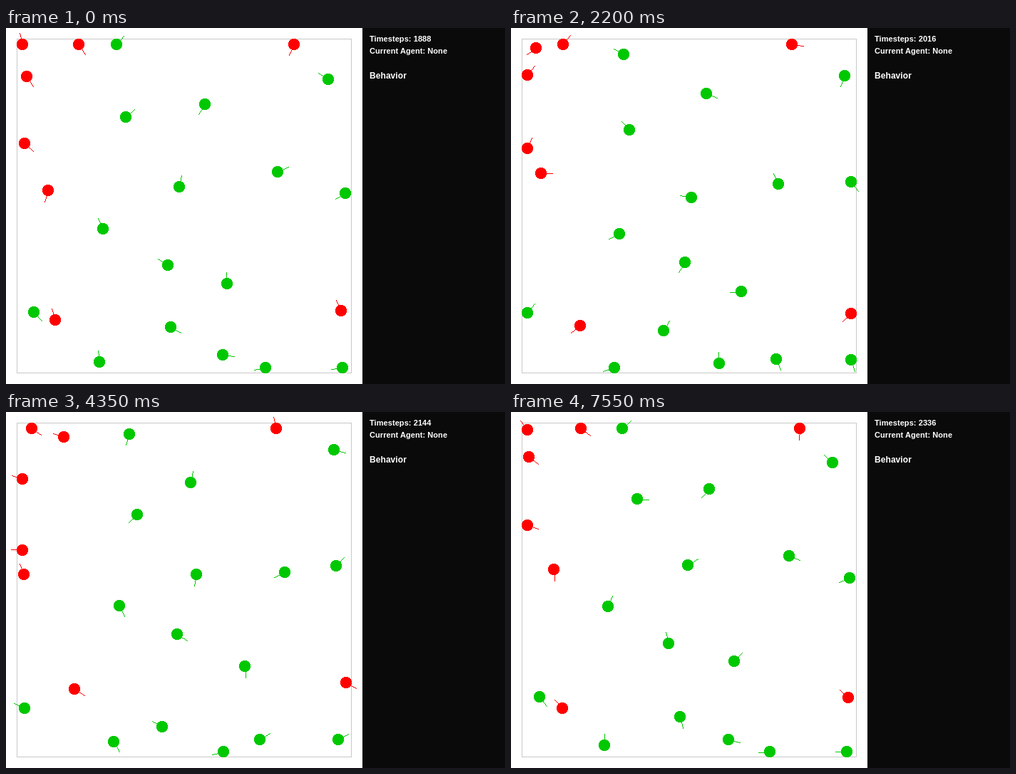
An HTML page with a canvas that plays this animation: 700x500 px, repeating every 8000 ms.

```html
<!DOCTYPE html>
<html lang="en">
<head>
<meta charset="utf-8">
<title>Swarm</title>
<style>
  html, body { margin: 0; width: 100%; height: 100%; overflow: hidden; background: #fff; }
  canvas, svg { display: block; position: absolute; top: 0; }
  canvas { left: 0; }
  svg { left: 500px; background: #0a0a0a; overflow: hidden; }
  text { font: bold 11px "Liberation Sans", Arial, sans-serif; fill: #fff; letter-spacing: .07px; }
  .title { font-size: 12px; }
</style>
</head>
<body>
<canvas width="500" height="500"></canvas>
<svg width="200" height="500">
  <text id="steps" x="10" y="19">Timesteps: 1888</text>
  <text x="10" y="36">Current Agent: None</text>
  <text class="title" x="10" y="71">Behavior</text>
</svg>
<script>
const LOOP = 8000;
const HOLDS = [600, 550, 500, 550, 550, 500, 550, 550, 500, 550, 550, 550, 500, 550, 450];
const RED = '#ff0000', GREEN = '#00c800';
const RADIUS = 8, WHISKER = 16.3;
const ctx = document.querySelector('canvas').getContext('2d');
const counter = document.getElementById('steps');
const agents = [];

// Each agent backs around a circle, turning by a fixed angle per step.
const orbit = (color, turn, radius) => (cx, cy, heading) =>
  agents.push({ color, turn, radius, cx, cy, heading });

const roam = orbit(GREEN, 22.5, 12.4);
roam(175.8, 134.5, 41);
roam(255, 225.5, 79);
roam(386, 213.5, 24);
roam(147.4, 277.4, 114);
roam(233.2, 322.5, 148);
roam(322.3, 357.8, 94);
roam(224.7, 431.2, -30);

const crowd = orbit(GREEN, 25.2, 10.7);
crowd(163, 28, 50);
crowd(458, 63, 146);
crowd(269.8, 101.5, 237);
crowd(471, 223, 208);
crowd(31, 406, -47);
crowd(142, 468, 96);
crowd(302.5, 470, -7);
crowd(362, 469, 190);
crowd(471, 469.5, 186);

const wide = orbit(RED, 27.3, 18);
wide(87, 18, -58);
wide(14, 77.5, -58);
wide(14, 176, -41);
wide(42, 222, -108);
wide(86, 404, 108);

const tight = orbit(RED, 27.3, 13);
tight(28, 17, 106);
tight(392, 15, -116);
tight(482, 392, 114);

// Walls stop an agent one radius inside the frame.
const insideWalls = v => Math.round(Math.min(477, Math.max(23, v)));

function disc(x, y) {
  for (let row = -RADIUS; row < RADIUS; row++) {
    const half = Math.round(Math.sqrt(RADIUS ** 2 - (row + 0.5) ** 2));
    ctx.fillRect(x - half, y + row, 2 * half, 1);
  }
}

// One-pixel line without smoothing.
function hardLine(x, y, dx, dy) {
  const n = Math.max(Math.abs(dx), Math.abs(dy));
  for (let i = 0; i <= n; i++) {
    ctx.fillRect(Math.round(x + dx * i / n), Math.round(y + dy * i / n), 1, 1);
  }
}

function draw(step) {
  ctx.fillStyle = '#fff';
  ctx.fillRect(0, 0, 500, 500);
  ctx.strokeStyle = '#c8c8c8';
  ctx.strokeRect(15.5, 15.5, 469, 469);
  for (const { color, turn, radius, cx, cy, heading } of agents) {
    const angle = (heading + turn * step) * Math.PI / 180;
    const sin = Math.sin(angle), cos = Math.cos(angle);
    const x = insideWalls(cx - radius * sin);
    const y = insideWalls(cy - radius * cos);
    ctx.fillStyle = color;
    disc(x, y);
    hardLine(x, y, Math.round(WHISKER * cos), Math.round(-WHISKER * sin));
  }
  counter.textContent = 'Timesteps: ' + (1888 + 32 * step);
}

function stepAt(time) {
  let step = 0;
  while (time >= HOLDS[step]) time -= HOLDS[step++];
  return step;
}

let shown = -1;
const origin = performance.now();
function tick() {
  const step = stepAt((performance.now() - origin) % LOOP);
  if (step !== shown) draw(shown = step);
  requestAnimationFrame(tick);
}
tick();
</script>
</body>
</html>
```
